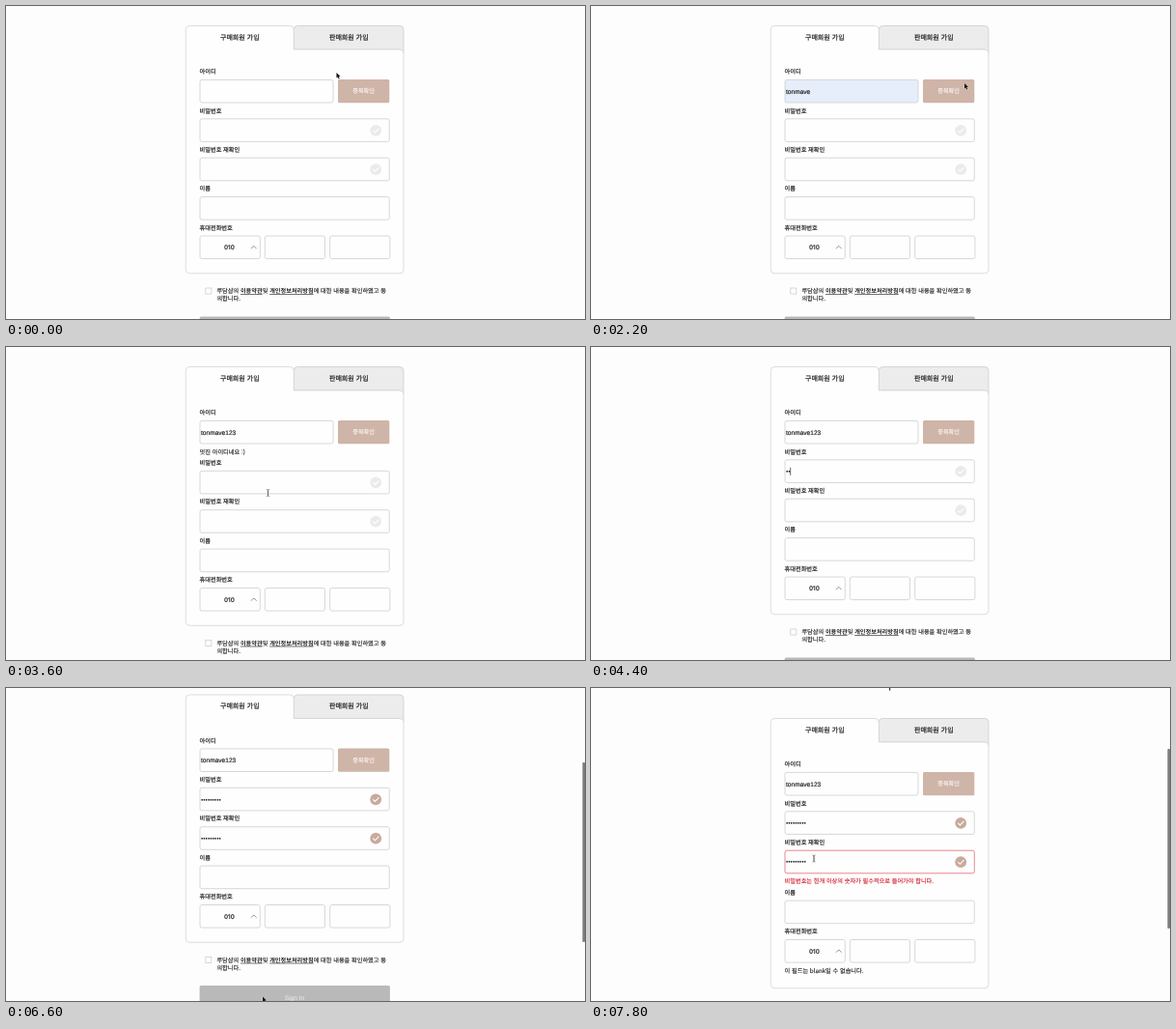
An HTML page for the animation above (8 s loop, 600 by 324 pixels).

```html
<!DOCTYPE html>
<html lang="ko">
<head>
<meta charset="utf-8">
<title>회원 가입</title>
<style>
  html, body { margin: 0; width: 100%; height: 100%; overflow: hidden; background: #fdfdfd; }
  svg { display: block; width: 100vw; height: 100vh; }
  text {
    font: 6.2px "Noto Sans CJK KR", "Noto Sans CJK", "Noto Sans", sans-serif;
    fill: #222; stroke: #222; stroke-width: .14; white-space: pre; text-rendering: geometricPrecision;
  }
  .label { font-weight: 500; stroke-width: .2; }
  .tab { font-size: 7px; font-weight: 500; text-anchor: middle; stroke-width: .2; }
  .value { font: 6.6px "Liberation Sans", Arial, sans-serif; stroke-width: .18; }
  .dots { stroke: none; }
  .digits { font: 500 6.3px Inter, sans-serif; }
  .option { font: 500 5.6px Inter, sans-serif; stroke-width: .1; }
  .button { text-anchor: middle; fill: #fbf6f4; stroke: #fbf6f4; }
  .submit { text-anchor: middle; fill: #f0f0f0; stroke: none; }
  .error { fill: #d5202e; stroke: #d5202e; }
  .link { font-weight: 700; text-decoration: underline; stroke: none; }
  .line { fill: #fefefe; stroke: #cbcbcb; stroke-width: .75; }
  .bad { stroke: #e0606c; }
  .filled { fill: #e6edfb; }
</style>
</head>
<body>
<svg id="stage" viewBox="0 0 600 324" preserveAspectRatio="none"></svg>
<script>
const STEP = 200, LOOP = 8000;
const ROW = 40.4, NOTE = 11.5;
const USER = "tonmave";
const OPTIONS = ["guest1", "mopdrop48", "taredong", "guest2", "guest5", USER];
const stage = document.getElementById("stage");

// Timelines: [start in ms, values...]; an entry holds until the next one.
const POINTER = [
  [0, "arrow", 342.5, 69], [200, "arrow", 363, 82], [600, "arrow", 348, 88],
  [800, "beam", 286, 91], [1000, "beam", 282, 91], [1200, "arrow", 272, 125],
  [1400, "arrow", 264, 165], [1600, "arrow", 261, 186], [1800, "arrow", 285, 160],
  [2000, "arrow", 350, 106], [2200, "arrow", 387, 80], [2800, "beam", 262, 90],
  [3000, "none"], [3400, "arrow", 366, 88], [3600, "beam", 271.5, 151],
  [3800, "beam", 262, 141], [4200, "none"], [6000, "arrow", 277, 290],
  [6200, "arrow", 272, 306], [6400, "arrow", 268, 317], [6600, "arrow", 266, 319.5],
  [7600, "arrow", 246, 240], [7800, "beam", 231, 176.5]
];
const NAME = [[0, ""], [1800, USER], [3000, USER + "1"], [3200, USER + "123"]];
const NAME_NOTE = [
  [0, ""], [600, "username 필드는 필수항목입니다.", true], [1800, ""],
  [2600, "이미 사용중인 아이디입니다.", true], [3000, ""],
  [3400, "멋진 아이디네요 :)"], [4200, ""]
];
const PASSWORD = [[0, 0], [4400, 2], [4600, 4], [4800, 5], [5000, 7], [5200, 8], [5400, 9]];
const REPEAT = [[0, 0], [5600, 4], [5800, 9]];
const SCROLL = [[0, 0], [6200, 5], [6400, 11], [6600, 13.5], [7600, 1], [7800, -11]];
const CARET = [[0, ""], [1000, "name"], [1800, ""], [2800, "name"], [3400, ""],
  [4000, "password"], [5600, "repeat"], [6000, ""]];

const at = (track, t) => track.filter(entry => entry[0] <= t).pop().slice(1);
const within = (t, from, to) => t >= from && t < to;

const text = (x, y, cls, str) => `<text x="${x}" y="${y}" class="${cls}">${str}</text>`;
const box = (x, y, w, h, cls = "") =>
  `<rect x="${x}" y="${y}" width="${w}" height="${h}" rx="2" class="line ${cls}"/>`;
const block = (x, y, w, h, fill, r = 0) =>
  `<rect x="${x}" y="${y}" width="${w}" height="${h}" rx="${r}" fill="${fill}"/>`;
const stroke = (d, color, width) =>
  `<path d="${d}" fill="none" stroke="${color}" stroke-width="${width}"/>`;

const tick = (y, on) =>
  `<circle cx="383.2" cy="${y + 12}" r="5.9" fill="${on ? "#c9aa9c" : "#ebebeb"}"/>` +
  stroke(`M380.3 ${y + 12}l2.1 2.1 4-4.1`, "#fff", 1.1);

// A labelled input; caretX is measured from the start of its value.
function field(y, label, { width = 196.3, value = "", dots = 0, caretX, cls = "", note, bad, check } = {}) {
  return text(200.6, y - 6.3, "label", label) +
    box(201, y, width, 23.6, `${cls} ${bad ? "bad" : ""}`) +
    text(202, y + 14.2, "value", value) +
    text(202, y + 14.2, "value dots", "•".repeat(dots)) +
    (caretX === undefined ? "" : block(201.8 + caretX, y + 8, .7, 8, "#222")) +
    (check === undefined ? "" : tick(y, check)) +
    (note ? text(200.6, y + 34.1, bad ? "error" : "", note) : "");
}

const secret = (count, focused) =>
  ({ dots: count, check: count > 7, caretX: focused ? count * 2.31 : undefined });

function frameLines(bottom) {
  return `<path class="line" style="fill:#ececec" d="M298.3 45V24.5a4 4 0 0 1 4-4H408a4 4 0 0 1 4 4V49l-4-4z"/>
    <path class="line" style="stroke:#d2d2d2" d="M186.3 24.5a4 4 0 0 1 4-4H294.3a4 4 0 0 1 4 4V45H408a4 4 0 0 1 4 4V${bottom - 4}a4 4 0 0 1-4 4H190.3a4 4 0 0 1-4-4z"/>` +
    text(242.3, 34.6, "tab", "구매회원 가입") + text(355.3, 34.6, "tab", "판매회원 가입");
}

function phone(y, failed) {
  return field(y, "휴대전화번호", { width: 62.3, note: failed && "이 필드는 blank일 수 없습니다." }) +
    text(226, y + 14.2, "digits", "010") +
    stroke(`M254 ${y + 13.2}l2.8-2.8 2.8 2.8`, "#777", .8) +
    box(268.3, y, 62.2, 23.6) + box(335.7, y, 62.2, 23.6);
}

function footer(y) {
  return `<rect x="206.8" y="${y + 15.2}" width="6" height="6" class="line"/>` +
    text(218.4, y + 20.4, "", `루담샵의 <tspan class="link">이용약관</tspan>및 <tspan class="link">개인정보처리방침</tspan>에 대한 내용을 확인하였고 동`) +
    text(218.4, y + 28.4, "", "의합니다.") +
    block(200.6, y + 44.7, 197.3, 24, "#b9b9b9", 1.5) +
    text(299, y + 59.2, "value submit", "Sign In");
}

function dropdown(hover) {
  return block(241, 102, 65.4, 95, "#0000000c", 3) +
    `<rect x="241.7" y="101" width="64" height="94.8" rx="2.5" fill="#fefefe" stroke="#e6e6e6" stroke-width=".5"/>` +
    (hover ? block(242, 179.5, 63.4, 14.6, "#eaeaea") : "") +
    OPTIONS.map((name, i) => text(246.4, 114.8 + i * 14.8, "option", name)).join("");
}

function pointer(kind, x, y) {
  if (kind === "arrow") return `<path transform="translate(${x} ${y})" d="M0 0V5.6L1.3 4.4 2.2 6.5 3.2 6.1 2.3 4.1H4z" fill="#111" stroke="#fff" stroke-width=".4" paint-order="stroke"/>`;
  if (kind === "beam") return stroke(`M${x - 1.5} ${y - 3.5}q1.5 0 1.5 1v5q0 1-1.5 1M${x + 1.5} ${y - 3.5}q-1.5 0-1.5 1v5q0 1 1.5 1`, "#444", .6);
  return "";
}

function draw(t) {
  const [scroll] = at(SCROLL, t), [caret] = at(CARET, t), [name] = at(NAME, t);
  const [note, bad] = at(NAME_NOTE, t);
  const [typed] = at(PASSWORD, t), [repeated] = at(REPEAT, t);
  const failed = t >= 7400;
  const top = 76.4, second = top + ROW + (note ? NOTE : 0), third = second + ROW;
  const fourth = third + ROW + (failed ? NOTE : 0), fifth = fourth + ROW;
  const bottom = fifth + 38.8 + (failed ? NOTE : 0);

  stage.innerHTML = `<g transform="translate(0 ${-scroll})">` +
    block(309, -16, 1.2, 7.6, "#333") +
    frameLines(bottom) +
    field(top, "아이디", { width: 138, value: name, note, bad,
      caretX: caret === "name" ? name.length * 3.65 : undefined,
      cls: within(t, 1800, 3000) ? "filled" : "" }) +
    block(344, 76, 53.3, 24.2, "#cfb4a8", 1.5) +
    text(370.6, 90.4, "button", "중복확인") +
    field(second, "비밀번호", secret(typed, caret === "password")) +
    field(third, "비밀번호 재확인", { ...secret(repeated, caret === "repeat"), bad: failed,
      note: failed && "비밀번호는 한개 이상의 숫자가 필수적으로 들어가야 합니다." }) +
    field(fourth, "이름") +
    phone(fifth, failed) +
    footer(bottom) +
    (within(t, 800, 1800) ? dropdown(t === 1600) : "") +
    "</g>" +
    (within(t, 6200, 7000) || t >= 7600 ? block(597.4, 69.3 + scroll * .57, 2.6, 186, "#7d7d7d", 1) : "") +
    pointer(...at(POINTER, t));
}

let shown = -1;
function play() {
  const t = Math.floor(performance.now() % LOOP / STEP) * STEP;
  if (t !== shown) draw(shown = t);
  requestAnimationFrame(play);
}
play();
</script>
</body>
</html>
```
